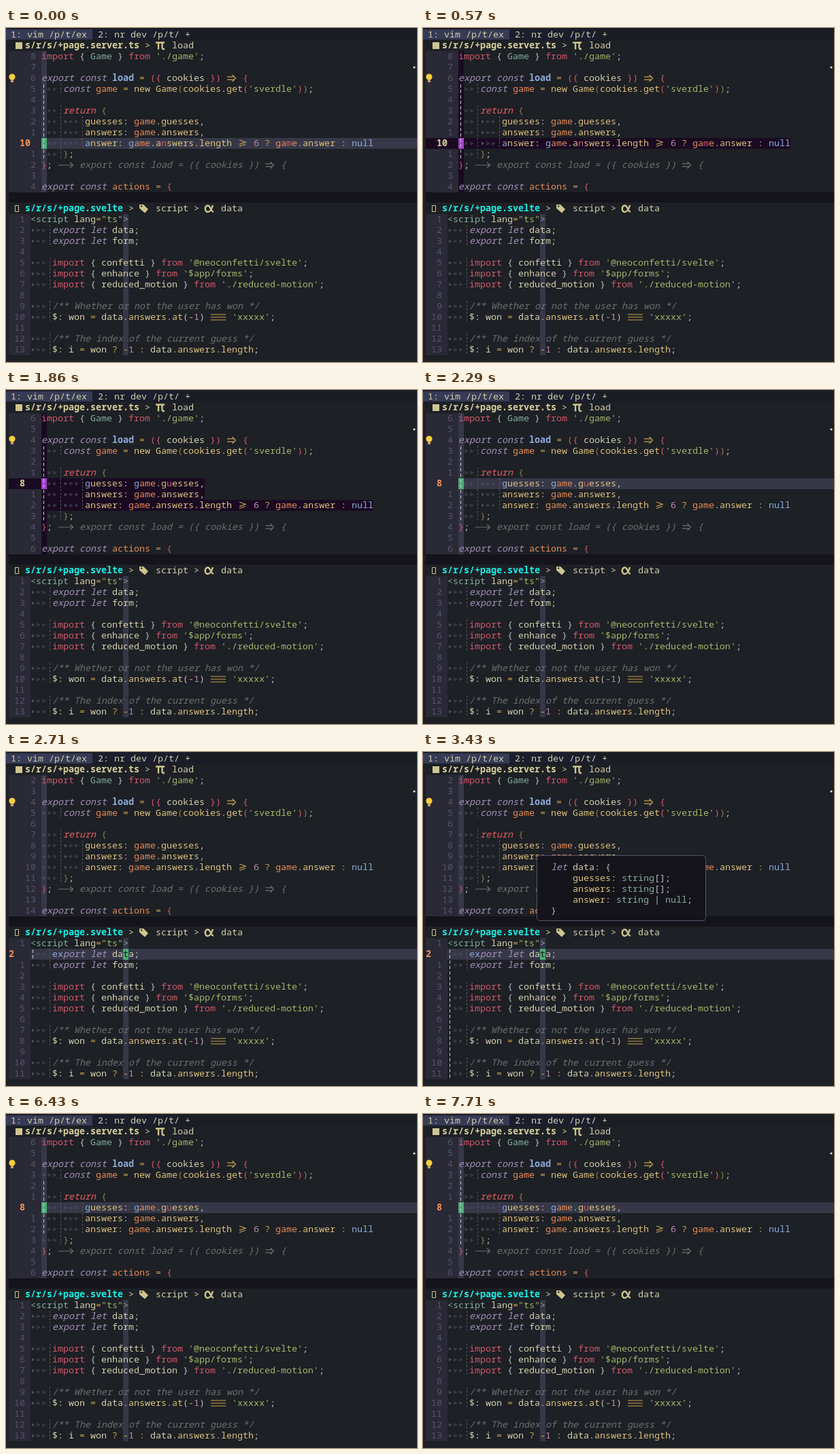
Recreate the animation shown at these times as an HTML page. Size 604 by 492 pixels, loop 8 s.

```html
<!DOCTYPE html>
<html lang="en">
<head>
<meta charset="utf-8">
<title>Editor session</title>
<style>
  html, body { margin: 0; width: 604px; height: 492px; overflow: hidden; background: #1d2025; }
  svg { display: block; }
  text { font: 13.333px "Noto Sans Mono", "DejaVu Sans Mono", monospace; white-space: pre; font-variant-ligatures: none; }
  .w { fill: #d5cfae; }
  .r { fill: #d2576c; }
  .R { fill: #e65c64; font-style: italic; }
  .m { fill: #a48fb9; font-style: italic; }
  .b { fill: #8ea9dc; }
  .B { fill: #8eabdb; font-weight: 700; }
  .o { fill: #e98b57; }
  .y { fill: #dcc07c; }
  .g { fill: #a3b56b; }
  .t { fill: #84ad9c; }
  .d { fill: #927c49; }
  .e { fill: #c9a24f; }
  .p { fill: #c08aab; }
  .c { fill: #6e6e70; font-style: italic; }
  .n { fill: #56536c; }
  .k { fill: #14161a; }
  .h { fill: #d8cf9d; font-weight: 700; }
  .q { fill: #16f0e6; font-weight: 700; }
  .O { fill: #f2925a; font-weight: 700; }
  .s { fill: #b9bcc4; }
</style>
</head>
<body>
<svg id="stage" width="604" height="492" viewBox="0 0 604 492"></svg>
<script>
// "~x" switches the text class to x
const SERVER = {
  x: 52, y: 34, rows: 13, first: 2, numEnd: 44, curX: 20, scope: [3, 9], col: 0,
  lines: [
    "~rimport ~s{ ~tGame ~s} ~rfrom ~g'./game'~s;",
    "",
    "~mexport const ~Bload ~e= ~r({ ~wcookies ~r})    {",
    "\t~mconst ~ogame ~e= ~ynew Game~d(~ycookies~s.~yget~r(~g'sverdle'~r)~d)~s;",
    "",
    "\t~Rreturn ~d{",
    "\t\t~yguesses~s: ~ogame~s.~yguesses~s,",
    "\t\t~yanswers~s: ~ogame~s.~yanswers~s,",
    "\t\t~yanswer~s: ~ogame~s.~yanswers~s.~ylength    ~p6 ~e? ~ogame~s.~yanswer ~e: ~bnull",
    "\t~d}~s;",
    "~r}~s;     ~cexport const load = ({ cookies })    {",
    "",
    "~mexport const ~oactions ~e= ~r{"
  ],
  hints: { 6: { 8: "b", 17: "b", 23: "r" }, 7: { 8: "b", 17: "b" }, 8: { 8: "b", 16: "b", 22: "r", 45: "r" } }
};
const PAGE = {
  x: 36, y: 274, rows: 13, first: 1, numEnd: 28, curX: 4, scope: [1, 12], col: 17,
  lines: [
    "~t<script ~wlang~e=~g\"ts\"~t>",
    "\t~mexport let ~wdata~s;",
    "\t~mexport let ~wform~s;",
    "",
    "\t~rimport ~s{ ~wconfetti ~s} ~rfrom ~g'@neoconfetti/svelte'~s;",
    "\t~rimport ~s{ ~wenhance ~s} ~rfrom ~g'$app/forms'~s;",
    "\t~rimport ~s{ ~wreduced_motion ~s} ~rfrom ~g'./reduced-motion'~s;",
    "",
    "\t~c/** Whether or not the user has won */",
    "\t~w$: won ~e= ~wdata~s.~yanswers~s.~yat~s(~e-~p1~s)     ~g'xxxxx'~s;",
    "",
    "\t~c/** The index of the current guess */",
    "\t~w$: i ~e= ~wwon ~e? -~p1 ~e: ~wdata~s.~yanswers~s.~ylength~s;"
  ],
  hints: { 1: { 4: "b", 5: "b", 17: "k" } }
};

// reach: how many rows the scope line has grown away from the cursor row
const STATES = [
  { at: 0, pane: SERVER, row: 8, reach: 9 },
  { at: 570, pane: SERVER, row: 8, reach: 9, visual: true },
  { at: 1140, pane: SERVER, row: 7, reach: 9, visual: true },
  { at: 1430, pane: SERVER, row: 6, reach: 9, visual: true },
  { at: 2140, pane: SERVER, row: 6, reach: 9 },
  { at: 2570, pane: PAGE, row: 1, reach: -1 },
  { at: 2710, pane: PAGE, row: 1, reach: 0 },
  { at: 2860, pane: PAGE, row: 1, reach: 5 },
  { at: 3000, pane: PAGE, row: 1, reach: 11 },
  { at: 3290, pane: PAGE, row: 1, reach: 11, popup: true },
  { at: 6430, pane: SERVER, row: 6, reach: 2 },
  { at: 6570, pane: SERVER, row: 6, reach: 9 }
];
const LOOP = 8000, CELL = 8, ROW = 16, SELECT_END = { 6: 292, 7: 292, 8: 540 };
const GUTTER = "#2a2936", LINE = "#363848", DARK = "#190a22";

const rect = (x, y, w, h, fill, more = "") =>
  `<rect x="${x}" y="${y}" width="${w}" height="${h}" fill="${fill}" ${more}/>`;
const path = (x, y, d, stroke, more = "") =>
  `<path transform="translate(${x} ${y})" d="${d}" fill="none" stroke="${stroke}" ${more}/>`;
const safe = s => s.replace(/&/g, "&amp;").replace(/</g, "&lt;");
const label = (x, top, s, cls) => `<text x="${x}" y="${top + 12}" class="${cls}">${safe(s)}</text>`;

function rich(x, top, line, hints = {}) {
  const runs = [];
  let col = 0;
  for (const part of line.split("~").slice(1)) {
    for (const ch of part.slice(1)) {
      const cls = hints[x.offset + col++] || part[0];
      const last = runs[runs.length - 1];
      if (last && last.cls === cls) last.s += ch;
      else runs.push({ cls, s: ch });
    }
  }
  const spans = runs.map(r => `<tspan class="${r.cls}">${safe(r.s)}</tspan>`).join("");
  return `<text x="${x.left}" y="${top + 12}">${spans}</text>`;
}

function tabMark(x, top, hideFirst) {
  const y = top + 8, dim = "#4d4c5c";
  let out = hideFirst ? "" : `<path d="M${x + 2} ${y - 2.5}l4.5 2.5-4.5 2.5z" fill="${dim}"/>`;
  for (const i of [1, 2]) out += path(x + i * CELL + 2, y, "M0-2l3.5 2-3.5 2z", dim, 'stroke-width=".9"');
  return out + path(x + 28.5, top, "M0 0v16", "#5a5963", 'stroke-dasharray="3 2.33"');
}

function drawPane(p, s) {
  const active = s.pane === p, high = p.rows * ROW, visual = active && s.visual;
  const rowY = i => p.y + i * ROW;
  const curX = p.x + p.col * CELL, curY = rowY(s.row);
  let out = rect(4, p.y, p.x - 4, high, GUTTER);
  out += rect(curX, p.y, CELL, high, visual ? DARK : LINE);
  if (visual) {
    out += rect(4, curY, p.x - 4, ROW, DARK);
    for (let i = s.row; i <= 8; i++) out += rect(p.x, rowY(i), SELECT_END[i] - p.x, ROW, DARK);
  } else if (active) out += rect(p.x, curY, 604 - p.x, ROW, LINE);
  if (active) out += rect(curX, curY, CELL, ROW, visual ? "#a143ca" : "#4cae78");

  p.lines.forEach((line, i) => {
    const top = rowY(i), tabs = line.lastIndexOf("\t") + 1, here = active && i === s.row;
    const scoped = active && i >= p.scope[0] && i <= p.scope[1] && Math.abs(i - s.row) <= s.reach;
    for (let t = 0; t < tabs; t++) out += tabMark(p.x + t * 32, top, scoped && t === 0);
    if (scoped) out += path(p.x + 3.5, top, "M0 1v14", "#c9c7c4", 'stroke-dasharray="5 3"');
    out += rich({ left: p.x + tabs * 32, offset: tabs * 4 }, top, line.slice(tabs), here ? p.hints[i] : {});
    if (here) out += label(p.curX, top, String(i + p.first), visual ? "h" : "O");
    else {
      const num = String(active ? Math.abs(i - s.row) : i + p.first);
      out += label(p.numEnd - num.length * CELL, top, num, "n");
    }
  });
  return out;
}

function operators() {
  const fat = "M1-2.2h10M1 2.2h10M8.5-5l5 5-5 5", gold = "#c9a24f";
  return path(324, 74, fat, gold, 'stroke-width="1.2"')
    + path(380, 202, fat, "#6e6e70", 'stroke-width="1.2"')
    + path(76, 202, "M1 0h21M18-4l4.5 4-4.5 4", "#6e6e70", 'stroke-width="1.2"')
    + path(340, 170, "M3-5l9 3.2-9 3.2M3 4.5l9-3.2", gold, 'stroke-width="1.2"')
    + path(300, 426, "M1-4h22M1 0h22M1 4h22", gold, 'stroke-width="1.2"');
}

function chrome() {
  const cream = "#cfc58f";
  return rect(0, 0, 604, 18, "#1b1d25") + rect(0, 2, 127, 15, "#373b55") + rect(128, 2, 127, 15, "#1b1e2d")
    + label(7, 2, "1: vim /p/t/ex", "w") + label(135, 2, "2: nr dev /p/t/", "w") + label(263, 2, "+", "w")
    + rect(4, 242, 600, 15, "#15131b")
    + rect(14, 21, 10, 10, cream)
    + label(28, 18, "s/r/s/+page.server.ts", "h") + label(204, 18, ">", "w") + label(244, 18, "load", "w")
    + path(220, 26, "M0-4.5h13M4-4v9.5M9.5-4v7q0 2.2 3.5 2", cream, 'stroke-width="2.4"')
    + path(13.5, 261.5, "M0 0h5v9h-5z", cream)
    + label(28, 258, "s/r/s/+page.svelte", "q") + label(180, 258, ">", "w")
    + `<path d="M196 260h6l7 7-5 5.5-8-7zM198 262.5a1.2 1.2 0 1 0 2.4 0a1.2 1.2 0 1 0-2.4 0z" fill="${cream}" fill-rule="evenodd"/>`
    + label(220, 258, "script", "w") + label(276, 258, ">", "w")
    + path(292, 266, "M12-5C10 2 7.500 5 4.500 5C-.5 5-.5-4.500 4.500-4.500C9-4.500 8.500 5 13 4.500", cream, 'stroke-width="2.4"')
    + label(316, 258, "data", "w")
    + '<circle cx="9" cy="72" r="4.6" fill="#f7cf3c"/>' + rect(7, 76, 4, 4, "#c9a066")
    + '<circle cx="600" cy="58" r="1.6" fill="#e6e2d6"/>';
}

function popup() {
  const lines = [
    [188, "~mlet ~wdata~s: {"],
    [220, "~yguesses~s: ~tstring~s[];"],
    [220, "~yanswers~s: ~tstring~s[];"],
    [220, "~yanswer~s: ~tstring ~s| ~tnull~s;"],
    [188, "~s}"]
  ];
  return rect(167.5, 152.5, 248, 96, "#15141b", 'rx="4" stroke="#57556a"')
    + lines.map(([left, s], i) => rich({ left, offset: 0 }, 162 + i * ROW, s)).join("");
}

const stage = document.getElementById("stage");
const fixedParts = chrome() + operators();
let shown;

function tick(now) {
  const t = now % LOOP;
  const s = STATES.filter(state => state.at <= t).pop();
  if (s !== shown) {
    shown = s;
    stage.innerHTML = drawPane(SERVER, s) + drawPane(PAGE, s) + fixedParts + (s.popup ? popup() : "");
  }
  requestAnimationFrame(tick);
}
tick(0);
</script>
</body>
</html>
```
